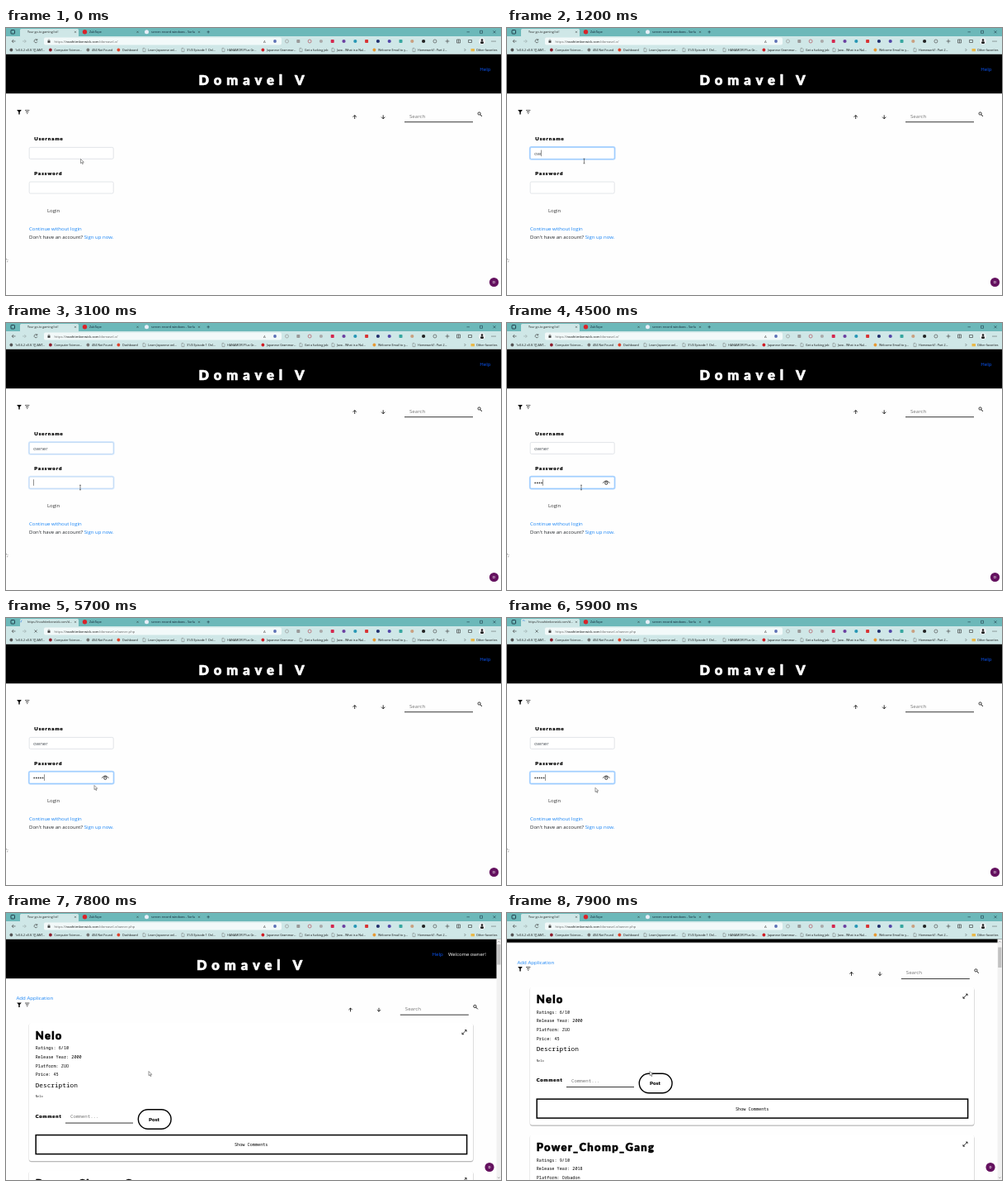
Animation, 600 px wide and 323 px high, one loop 8000 ms. Source, as an HTML page:

```html
<!DOCTYPE html>
<html lang="en">
<head>
<meta charset="utf-8">
<title>Gaming list</title>
<style>
  html, body { margin: 0; width: 100%; height: 100%; overflow: hidden; background: #fff; }
  svg { display: block; width: 100vw; height: 100vh; }
  text { white-space: pre; }
  .ui { font-family: "Open Sans", "Noto Sans", sans-serif; }
  .round { font-family: Lato, sans-serif; font-weight: 900; stroke-linejoin: round; }
  .mono { font-family: "Noto Sans Mono", "DejaVu Sans Mono", monospace; }
</style>
</head>
<body>
<svg id="stage" viewBox="0 0 600 323"></svg>
<script>
const LOOP = 8000, LOADING = 5250, LOADED = 5950, SCROLL = 7850;
const FOCUS_USER = 370, FOCUS_PASS = 3030;
const userKeys = [770, 1170, 1270, 1470, 1670];
const passKeys = [3770, 3870, 4170, 4470, 4670];
const USER = 'owner', SITE = 'noahtimberwick.com', FOLDER = '/domavel-v/';

const text = (x, y, s, size, fill = '#222', cls = 'ui', more = '') =>
  `<text x="${x}" y="${y}" font-size="${size}" fill="${fill}" class="${cls}" ${more}>${s}</text>`;
const rect = (x, y, w, h, fill, more = '') =>
  `<rect x="${x}" y="${y}" width="${w}" height="${h}" fill="${fill}" ${more}/>`;
const dot = (x, y, r, fill, more = '') => `<circle cx="${x}" cy="${y}" r="${r}" fill="${fill}" ${more}/>`;
const line = (d, color = '#222', w = 0.7, more = '') =>
  `<path d="${d}" fill="none" stroke="${color}" stroke-width="${w}" ${more}/>`;
const group = (id, body, more = '') => `<g id="${id}" ${more}>${body}</g>`;
// A thin outline rounds the corners of the heavy display letters.
const spaced = (x, y, s, size, gap, fill = '#000') =>
  text(x, y, s, size, fill, 'round', `letter-spacing="${gap}" stroke="${fill}" stroke-width="${size * 0.035}"`);

function browser() {
  const ink = '#333', bar = '#cfe7e7';
  let out = rect(0, 0, 600, 10.5, '#6cb8b9') + rect(0, 10, 600, 21.5, bar)
    + rect(17, 1, 71, 10, bar, 'rx="1.5"')
    + rect(6, 2.5, 4.5, 4.5, 'none', 'stroke="#123" stroke-width=".8" rx=".8"')
    + text(26, 6.2, '', 3.6, '#222', 'ui', 'id="tabTitle"')
    + group('spinner', line('M20 2.8A2 2 0 0 1 22 4.8', '#2a7be0', 0.6))
    + dot(95.5, 4.8, 2.7, '#d9232a') + text(101, 6.2, 'ZubTape', 3.7, '#123')
    + dot(170.5, 4.8, 2.5, '#e8eef8') + text(176, 6.2, 'screen record windows - Sorlu', 3.8, '#123');
  for (const x of [84, 159.5, 234])
    out += line(`M${x - 1} 3.8l2 2m0 -2l-2 2`, '#222', 0.45);
  out += line('M243.5 4.8h3.4M245.2 3.1v3.4M558.5 4.8h3.4M574.5 3.3h3v3h-3zM590.5 3.3l3 3m0 -3l-3 3', '#123', 0.5);

  out += rect(46, 11.6, 288, 9, '#f2f9f9', 'rx="2"')
    + line('M11.5 16H7.2m2 -2l-2 2l2 2', ink, 0.6) + line('M20 16h4.3m-2 -2l2 2l-2 2', '#94a5a5', 0.6)
    + group('reload', line('M37.6 14.4A2 2 0 1 0 38 16.5M37.8 13.2v1.6h-1.6', ink, 0.6))
    + group('stop', line('M34.5 14.4l3.2 3.2m0 -3.2l-3.2 3.2', ink, 0.6))
    + rect(50.5, 15.4, 3, 2.4, ink) + line('M51.2 15.4v-.8a.8 .8 0 0 1 1.6 0v.8', ink, 0.4)
    + text(58.5, 17.6, `https://<tspan fill="#111">${SITE}</tspan><tspan id="path"></tspan>`, 4.1, '#666')
    + text(312, 17.6, 'A', 4.3, '#555') + dot(326, 16, 1.9, '#5b6fb5');
  const badges = ['#999', '#999', '#b5535f', '#aaa', '#d5284f', '#6b3fa0', '#2796b5', '#d83434',
    '#22306e', '#5146a8', '#38a7a0', '#c9a080', '#222', '#555'];
  badges.forEach((c, i) => {
    const x = 340.5 + i * 13.8;
    out += i % 13 === 0 || i === 2 ? dot(x, 16, 2, 'none', `stroke="${c}" stroke-width=".7"`)
      : i % 3 === 1 ? rect(x - 2, 14, 4, 4, c, 'rx=".8"') : dot(x, 16, 2.1, c);
  });
  out += line('M535 13.6v4.8M532.6 16h4.8M546.5 14h4v4h-4zM548.5 14v4M560.5 14.5h4v3h-4z', ink, 0.6)
    + dot(577, 16, 3.8, '#f1f3f5') + dot(577, 14.6, 1.3, '#222') + rect(575, 16.2, 4, 2.8, '#222', 'rx="1.2"')
    + [589, 591, 593].map(x => dot(x, 16, 0.5, '#222')).join('');

  const marks = [
    [11, '1v0.6.2 v0.8.1[] ANT...', '#555'], [58.5, 'Computer Science...', '#8d1f2d'],
    [104, '404 Not Found', '#777'], [141, 'Dashboard', '#e0452f'], [172, 'Learn Japanese onl...', '#666'],
    [219, '31/4 Episode 1 Onl...', '#666'], [268, 'HANAMORI Plus Gr...', '#666'],
    [316, 'Japanese Grammar...', '#d02028'], [362, 'Get a fucking job', '#666'],
    [401, 'Java - What is a Nul...', '#666'], [451, 'Welcome Email to y...', '#e69a35'],
    [499, 'Homework1: Part 2...', '#666'], [570, 'Other favorites', '#e9b949']];
  for (const [x, label, c] of marks) {
    out += c === '#666' ? line(`M${x - 6} 24.4h2l1 1v3.2h-3z`, c, 0.45)
      : c === '#e9b949' ? rect(x - 6.5, 24.9, 4.5, 3.4, c, 'rx=".5"')
      : dot(x - 4.6, 26.5, 1.9, c);
    out += text(x, 27.9, label, 3.65, '#111');
  }
  return out + line('M555.5 25l1.5 1.5l-1.5 1.5', ink, 0.5);
}

const header = titleX => rect(0, 31.5, 600, 47.8, '#000') + rect(0, 79.3, 600, 0.7, '#ccc')
  + spaced(titleX, 69.1, 'Domavel V', 16.5, 5.9, '#fff');

// Filter icons, sort arrows and search field; dx moves only the right part.
const tools = (dx, dy) => `<g transform="translate(0 ${dy})">
  <path d="M13.2 99h5.6l-2.1 2.7v2.8h-1.4v-2.8z" fill="#000"/>
  ${line('M23 99.6h5.4M24 101.5h3.4M25 103.4h1.4', '#111')}
  <g transform="translate(${dx} 0)">
  ${line('M422.7 110v-4.4m-2.1 2.1l2.1 -2.1l2.1 2.1M457.2 105.4v4.4m-2.1 -2.1l2.1 2.1l2.1 -2.1', '#000', 0.8)}
  ${text(489, 108.6, 'Search', 6.1, '#757575')}${rect(483, 113.3, 83, 0.9, '#222')}
  ${dot(573.6, 103.5, 1.6, 'none', 'stroke="#000" stroke-width=".8"')}${line('M574.7 104.6l2.3 2.3', '#000', 0.9)}
  </g></g>`;

const badge = x => dot(x, 307.5, 5.6, '#64115f');
const letter = x => text(x, 309, 'D', 4.2, '#fff', 'ui', 'font-weight="600" text-anchor="middle"');

const field = (id, y) => rect(27.6, y - 0.4, 103.2, 15.2, 'none', `id="${id}Ring" rx="2" stroke="#007bff" stroke-width="1.5"`)
  + rect(28.2, y + 0.2, 102, 14, '#fff', `id="${id}Box" rx="1.5" stroke-width=".6"`);

function loginPage() {
  return header(233.5) + text(574.3, 51.8, 'Help', 6.1, '#0a58ff') + tools(0, 0)
    + spaced(34.3, 136.4, 'Username', 6, 1) + field('user', 144.2)
    + spaced(34.3, 178, 'Password', 6, 1) + field('pass', 185.9)
    + text(33, 154, '', 6, '#495057', 'ui', 'id="name"') + group('dots', '')
    + group('eye', line('M116.3 193.6q4 -5.4 8 0', '#222', 0.9) + dot(120.3, 193.7, 1.6, 'none', 'stroke="#222" stroke-width=".9"'))
    + rect(0, 0, 0.5, 7.6, '#222', 'id="caret"')
    + text(50, 223.2, 'Login', 6, '#333')
    + text(28, 245.1, 'Continue without login', 6, '#1683f5')
    + text(28, 254.6, 'Don\'t have an account? <tspan fill="#1683f5">Sign up now.</tspan>', 6.03, '#212529')
    + text(0, 283, "';", 6, '#333') + badge(591.5) + letter(591.5);
}

function card(y, name, rating, year, platform) {
  const rows = [`Ratings: ${rating}/10`, `Release Year: ${year}`, `Platform: ${platform}`, 'Price: 45'];
  return `<g transform="translate(0 ${y})">`
    + rect(27.5, 0.6, 539, 167.4, '#000', 'rx="3" opacity=".15"') + rect(28, 1.4, 538.4, 167, '#000', 'rx="3" opacity=".15"')
    + rect(28, 0, 538, 167, '#fff', 'rx="2.5"')
    + spaced(35.7, 19.8, name, 13, 1.3)
    + line('M552.9 13.7l5.2 -5.2m-2.1 .1h2.1v2.1M552.9 11.6v2.1h2.1', '#000', 0.75)
    + rows.map((r, i) => text(35.7, 32.3 + i * 10.6, r, 5.2, '#000', 'mono')).join('')
    + text(35.7, 77.8, 'Description', 7.75, '#000', 'mono', 'font-weight="500"') + text(35.7, 90.3, name, 3.8, '#333', 'mono')
    + spaced(35.7, 114.8, 'Comment', 5.8, 0.9) + text(78, 115, 'Comment...', 5.75, '#757575', 'mono')
    + rect(72, 120.6, 82, 0.9, '#222')
    + rect(160.3, 104.8, 39.8, 23.4, '#fff', 'rx="11.7" stroke="#000" stroke-width="1.4"')
    + text(173, 118.7, 'Post', 6.4, '#000', 'round')
    + rect(36.2, 135.6, 522.4, 23, '#fff', 'stroke="#000" stroke-width="1.5"')
    + text(277, 149, 'Show Comments', 5.2, '#000', 'mono') + '</g>';
}

function listPage() {
  const body = header(231) + text(516.5, 51.8, 'Help', 6.1, '#0a58ff')
    + text(536, 51.8, `Welcome ${USER}!`, 5.9, '#fff')
    + text(12.5, 105.1, 'Add Application', 6.1, '#1683f5') + tools(-5.2, 9.4)
    + card(133, 'Nelo', 6, 2000, 'ZUO') + card(312, 'Power_Chomp_Gang', 9, 2018, 'Orbadon');
  return group('scroller', body) + rect(594.5, 31.5, 5.5, 291.5, '#f1f1f1')
    + rect(595.2, 38, 4.2, 24.5, '#c1c1c1', 'id="thumb"')
    + line('M596 35.5l1.3 -1.4l1.3 1.4M596 319.5l1.3 1.4l1.3 -1.4', '#666', 0.5)
    + badge(586) + group('letter', letter(586))
    + group('ghost', '<path d="M583.7 310v-2.6a2.3 2.3 0 0 1 4.6 0v2.6l-1.2 -.8l-1.1 .8l-1.1 -.8z" fill="#fff"/>'
      + dot(585.2, 307.3, 0.4, '#64115f') + dot(586.8, 307.3, 0.4, '#64115f'));
}

const stage = document.getElementById('stage');
stage.innerHTML = rect(0, 0, 600, 323, '#fefefe') + group('login', loginPage()) + group('list', listPage())
  + group('browser', browser())
  + group('arrow', '<path d="M0 0v5.2l1.2 -1.1l.9 2l.9 -.4l-.9 -1.9h1.7z" fill="#fff" stroke="#222" stroke-width=".45"/>')
  + group('beam', line('M-1 -2.8h2M0 -2.8v5.6M-1 2.8h2', '#222', 0.55));

const $ = id => document.getElementById(id);
const show = (id, on) => $(id).setAttribute('display', on ? 'inline' : 'none');
const set = (id, name, value) => $(id).setAttribute(name, value);
const clamp = v => Math.max(0, Math.min(1, v));
const count = (keys, t) => keys.filter(k => t >= k).length;

// time, x, y of the pointer
const route = [[0, 90.5, 158.5], [100, 90.5, 158.5], [190, 93.5, 161], [2450, 93.5, 161], [2950, 90, 199],
  [4500, 90, 199], [5250, 98, 199], [5600, 107, 201], [5950, 107, 206], [6250, 105.5, 211], [6430, 105.5, 211],
  [6550, 82, 223], [6700, 125, 233.5], [6900, 180, 222], [7050, 208, 190], [7180, 192, 174],
  [7350, 178, 186], [7600, 173, 191.5], [LOOP, 173, 191.5]];

function pointer(t) {
  const i = Math.max(1, route.findIndex(p => p[0] > t));
  const [a, b] = [route[i - 1], route[i]], k = (t - a[0]) / (b[0] - a[0]);
  return [a[1] + (b[1] - a[1]) * k, a[2] + (b[2] - a[2]) * k];
}

function focusStyle(id, k) {
  const mix = (a, b) => Math.round(a + (b - a) * k);
  set(id + 'Box', 'stroke', `rgb(${mix(206, 112)},${mix(212, 182)},${mix(218, 255)})`);
  set(id + 'Ring', 'opacity', 0.3 * k);
}

function draw(t) {
  const loaded = t >= LOADED, loading = t >= LOADING && !loaded;
  show('login', !loaded);
  show('list', loaded);

  const typed = count(userKeys, t), hidden = count(passKeys, t);
  const toPass = clamp((t - FOCUS_PASS) / 150);
  focusStyle('user', clamp((t - FOCUS_USER) / 30) * (1 - toPass));
  focusStyle('pass', toPass);
  $('name').textContent = USER.slice(0, typed);
  $('dots').innerHTML = Array.from({ length: hidden }, (_, i) => dot(34.2 + i * 2.6, 193.4, 0.85, '#333')).join('');
  show('eye', hidden > 0);

  const inPass = t >= FOCUS_PASS;
  const last = [FOCUS_USER, ...userKeys, FOCUS_PASS, 3275, ...passKeys].filter(k => k <= t).pop();
  show('caret', t >= FOCUS_USER && Math.floor((t - last) / 500) % 2 === 0);
  const nameEnd = typed ? $('name').getComputedTextLength() : 0;
  set('caret', 'x', inPass ? 33 + hidden * 2.6 : 33 + nameEnd);
  set('caret', 'y', inPass ? 189.2 : 147.6);

  $('tabTitle').textContent = loading ? `https://${SITE}/d...` : 'Your go-to gaming list!';
  $('path').textContent = FOLDER + (t >= LOADING ? USER + '.php' : '');
  show('spinner', loading);
  set('spinner', 'transform', `rotate(${t * 0.36} 20 4.8)`);
  show('reload', !loading);
  show('stop', loading);

  const scrolled = t >= SCROLL;
  set('scroller', 'transform', `translate(0 ${scrolled ? -43.5 : 0})`);
  set('thumb', 'y', scrolled ? 41.5 : 38);
  show('ghost', t < 7370);
  show('letter', t >= 7370);

  const [x, y] = pointer(t), beam = t >= 150 && t < 5400;
  show('beam', beam);
  show('arrow', !beam);
  set(beam ? 'beam' : 'arrow', 'transform', `translate(${x} ${y})`);
}

function tick() {
  draw(performance.now() % LOOP);
  requestAnimationFrame(tick);
}
tick();
</script>
</body>
</html>
```
